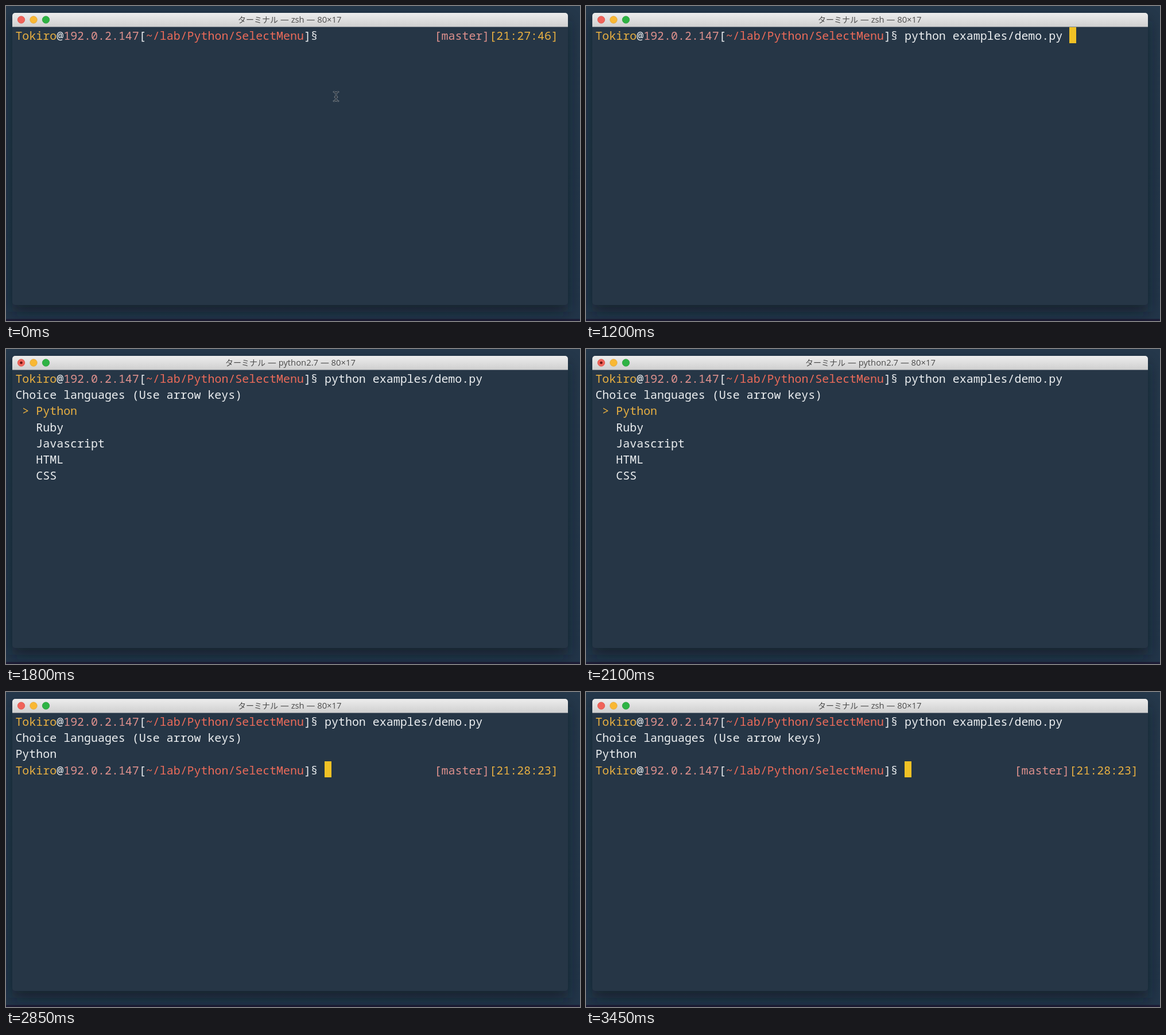
Recreate the animation shown at these times as an HTML page. Size 1000 px wide and 550 px high, loop 3.6 s.

```html
<!DOCTYPE html>
<html lang="ja">
<head>
<meta charset="utf-8">
<title>Terminal menu</title>
<style>
html, body { margin: 0; width: 100%; height: 100%; overflow: hidden; background: #24374a; }
svg { display: block; width: 100vw; height: 100vh; }
text { white-space: pre; }
#screen text { font: 300 19.95px "Noto Sans Mono", monospace; }
.kana { font: 14px "Noto Sans CJK JP", "Noto Sans CJK", sans-serif; }
.latin { font: 14.8px "Open Sans", sans-serif; }
</style>
</head>
<body>
<svg viewBox="0 0 1000 550" xmlns="http://www.w3.org/2000/svg">
  <defs>
    <linearGradient id="bar" x2="0" y2="1">
      <stop offset="0" stop-color="#ededed"/>
      <stop offset="1" stop-color="#cfcfcf"/>
    </linearGradient>
    <linearGradient id="desk" x2="0" y2="1">
      <stop offset="0" stop-color="#25384b"/>
      <stop offset="1" stop-color="#223549"/>
    </linearGradient>
    <filter id="blur" x="-10%" y="-10%" width="120%" height="125%">
      <feGaussianBlur stdDeviation="12"/>
    </filter>
    <path id="beam" d="M571 150q4 0 4 3V163q0 3-4 3M579 150q-4 0-4 3V163q0 3 4 3M573 159h4"/>
  </defs>
  <rect width="1000" height="550" fill="url(#desk)"/>
  <rect y="546.5" width="1000" height="3.5" fill="#1d1c35"/>
  <rect x="11" y="26" width="968" height="508" rx="5" fill="#0a121c" opacity=".58" filter="url(#blur)"/>
  <rect x="11" y="12" width="968" height="510" rx="5" fill="#263646"/>
  <path d="M11 36.5V17a5 5 0 0 1 5-5H974a5 5 0 0 1 5 5V36.5z" fill="url(#bar)"/>
  <g stroke-width=".8">
    <circle cx="26.5" cy="24" r="6.2" fill="#f0635a" stroke="#dc5148"/>
    <circle cx="48" cy="24" r="6.2" fill="#f9b834" stroke="#e3a230"/>
    <circle cx="69.5" cy="24" r="6.2" fill="#2eb344" stroke="#27a03a"/>
  </g>
  <circle id="busy" cx="26.5" cy="24" r="2.3" fill="#6d1210"/>
  <g fill="#4b4b4b">
    <text id="app" class="kana" y="29">ターミナル</text>
    <text id="title" class="latin" y="29"></text>
  </g>
  <g id="screen"></g>
  <g id="pointer" fill="none" stroke-linecap="round">
    <use href="#beam" stroke="#a9b2ba" stroke-width="2.6"/>
    <use href="#beam" stroke="#17202a" stroke-width="1.4"/>
  </g>
</svg>
<script>
const LOOP = 3600;
const MENU_AT = 1500;
const DONE_AT = 2550;
const CELL = 11.97, LINE = 28.2, LEFT = 16.4, TOP = 36.6;
const WHITE = '#eceff1', YELLOW = '#e9b041', PINK = '#df918d', RED = '#ec6b59';
const LANGUAGES = ['Python', 'Ruby', 'Javascript', 'HTML', 'CSS'];
const PROMPT = [
  ['Tokiro', YELLOW], ['@', WHITE], ['192.0.2.147', PINK], ['[', WHITE],
  ['~/lab/Python/SelectMenu', RED], [']§', WHITE]
];
const COMMAND_COL = 45, CLOCK_COL = 61;
const COMMAND = 'python examples/demo.py ';
// [start time, characters typed]
const TYPING = [[0, 0], [150, 1], [300, 7], [450, 11], [600, 16], [750, 17], [900, 24]];

const byId = id => document.getElementById(id);
const show = (id, on) => byId(id).setAttribute('visibility', on ? 'visible' : 'hidden');

const label = (row, col, text, color) =>
  `<text x="${LEFT + col * CELL}" y="${59 + row * LINE}" fill="${color}">${text.replace('>', '&gt;')}</text>`;

function segments(row, col, parts) {
  return parts.map(([text, color]) => {
    const out = label(row, col, text, color);
    col += text.length;
    return out;
  }).join('');
}

const prompt = row => segments(row, 0, PROMPT);
const clock = (row, time) => segments(row, CLOCK_COL, [['[master]', PINK], [`[${time}]`, YELLOW]]);
const cursor = (row, col) =>
  `<rect x="${Math.round(LEFT + col * CELL)}" y="${Math.round(TOP + row * LINE)}" width="12" height="28" fill="#f0c125"/>`;

function menu() {
  return LANGUAGES.map((name, i) => {
    const color = i ? WHITE : YELLOW;
    return (i ? '' : label(2, 1, '>', color)) + label(i + 2, 3, name, color);
  }).join('');
}

function screenAt(t) {
  const typed = TYPING.filter(([start]) => t >= start).pop()[1];
  let out = prompt(0) + label(0, COMMAND_COL, COMMAND.slice(0, typed), WHITE);
  if (t < MENU_AT) {
    if (typed) out += cursor(0, COMMAND_COL + typed);
    if (COMMAND_COL + typed < CLOCK_COL) out += clock(0, '21:27:46');
    return out;
  }
  out += label(1, 0, 'Choice languages (Use arrow keys)', WHITE);
  if (t < DONE_AT) return out + menu();
  return out + label(2, 0, LANGUAGES[0], WHITE) + prompt(3) +
    cursor(3, COMMAND_COL) + clock(3, '21:28:23');
}

let shown = '';
function render(t) {
  const content = screenAt(t);
  if (content === shown) return;
  byId('screen').innerHTML = shown = content;
  const running = t >= MENU_AT && t < DONE_AT;
  show('busy', running);
  show('pointer', t < TYPING[1][0]);
  byId('app').setAttribute('x', running ? 382 : 404);
  byId('title').setAttribute('x', running ? 456 : 478);
  byId('title').textContent = `— ${running ? 'python2.7' : 'zsh'} — 80×17`;
}

const start = performance.now();
function tick() {
  render((performance.now() - start) % LOOP);
  requestAnimationFrame(tick);
}
tick();
</script>
</body>
</html>
```
